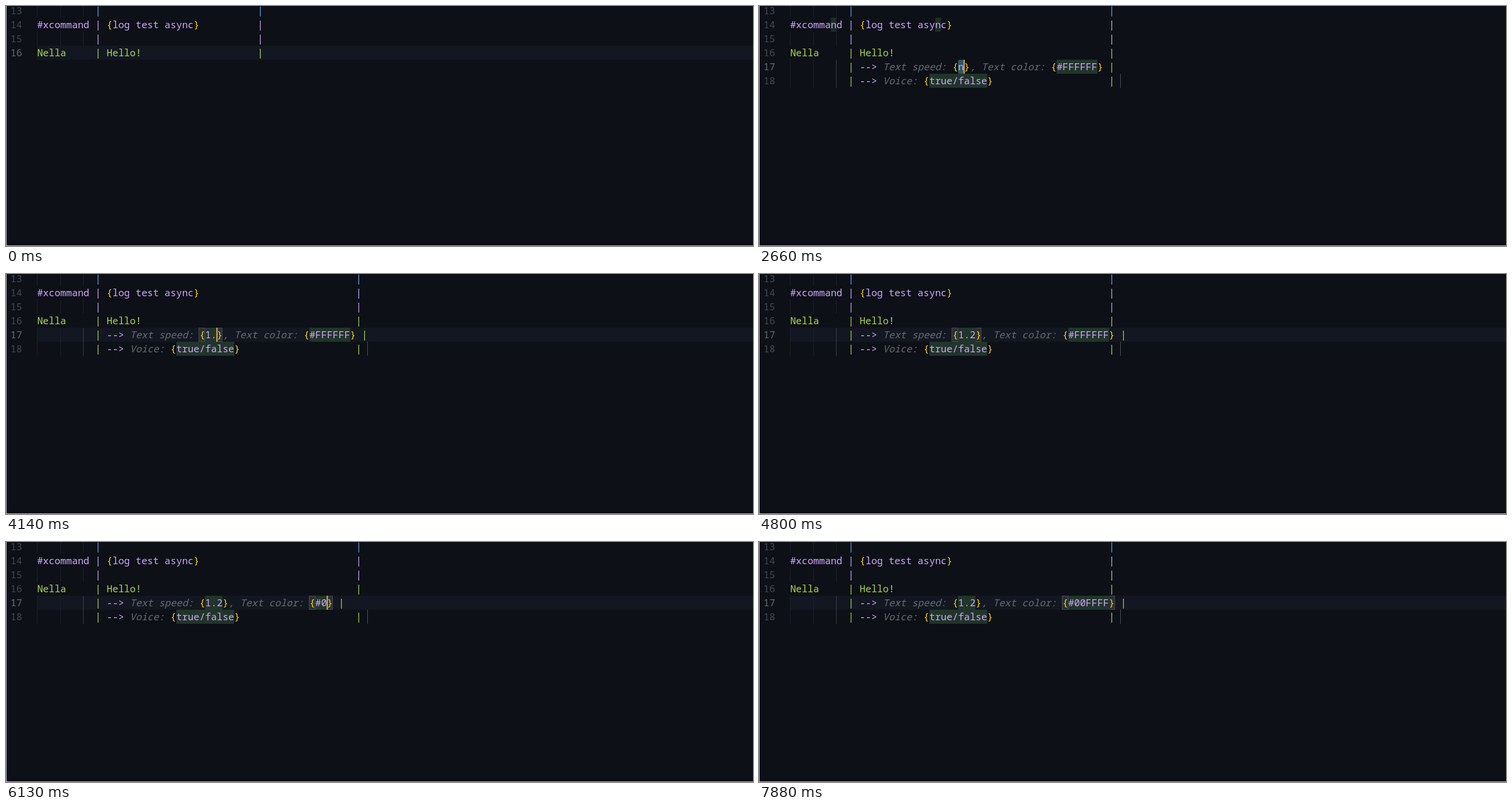
Recreate the animation shown at these times as an HTML page with a canvas. Size 1280 by 411 pixels, loop 8000 ms.

```html
<!DOCTYPE html>
<html lang="en">
<head>
<meta charset="utf-8">
<title>Editor</title>
<style>
html, body { margin: 0; width: 100%; height: 100%; overflow: hidden; background: #0d1017; }
canvas { display: block; }
</style>
</head>
<body>
<canvas id="stage" width="1280" height="411"></canvas>
<script>
const ctx = document.getElementById('stage').getContext('2d', { alpha: false });
const LOOP = 8000, LEFT = 53.4, PITCH = 9.93, LINE = 24, TOP = -4, FIRST = 13;
const FONT = '16.55px "Noto Sans Mono", monospace';
const C = {
  bg: '#0d1017', row: '#131721', num: '#434853', numOn: '#646b74',
  purple: '#d2a6ff', green: '#aad94c', blue: '#59a8f4', gold: '#ffd700',
  note: '#666b72', guide: '#1c2029', guideOn: '#3a3e47', stop: '#4c5056',
  slot: '#21352a', same: '#1c2d27', select: '#2d5860',
  match: '#2b2f36', matchEdge: '#454950', cursor: '#e6b450', edge: '#c4c4c8'
};

const colX = c => LEFT + c * PITCH;
const rowY = n => TOP + (n - FIRST) * LINE;

function box(x, y, w, h, color) {
  ctx.fillStyle = color;
  ctx.fillRect(x, y, w, h);
}

function text(n, col, str, color, italic) {
  ctx.font = (italic ? 'italic ' : '') + FONT;
  ctx.fillStyle = color;
  [...str].forEach((ch, i) => ctx.fillText(ch, colX(col + i), rowY(n) + 18));
}

function mark(n, col, len, color, radius = 0) {
  const x = Math.round(colX(col)), w = Math.round(colX(col + len)) - x;
  ctx.fillStyle = color;
  ctx.beginPath();
  ctx.roundRect(x, rowY(n), w, LINE, radius);
  ctx.fill();
}

function bracketBox(col) {
  const x = Math.round(colX(col)) - 1;
  box(x, rowY(17), 11, LINE, C.match);
  ctx.strokeStyle = C.matchEdge;
  ctx.strokeRect(x + 0.5, rowY(17) + 0.5, 10, LINE - 1);
}

function guides(n, active) {
  [0, 4, 8].forEach(c =>
    box(Math.floor(colX(c)), rowY(n), 1, LINE, active && c === 8 ? C.guideOn : C.guide));
}

function number(n, active) {
  ctx.font = FONT;
  ctx.fillStyle = active ? C.numOn : C.num;
  [...String(n)].forEach((ch, i) => ctx.fillText(ch, 7.8 + i * PITCH, rowY(n) + 18));
}

function cursor(n, col) {
  box(Math.round(colX(col)) - 0.5, rowY(n), 2, LINE, C.cursor);
}

function rowHighlight(n) {
  box(53, rowY(n), 1227, LINE, C.row);
}

const passed = (t, times) => times.filter(s => t >= s).length;

function editorState(t) {
  const speedKeys = passed(t, [3880, 4140, 4360]);
  const colorKeys = passed(t, [5800, 6130, 6330, 6800, 7000, 7200, 7330]);
  const field = t < 5070 ? 0 : 1;
  const selected = field ? !colorKeys : !speedKeys;
  const off = [[3120, 3590], [4800, 5070], [5540, 5800], [7880, LOOP]];
  return {
    speed: speedKeys ? '1.2'.slice(0, speedKeys) : 'n',
    color: colorKeys ? '#00FFFF'.slice(0, colorKeys) : '#FFFFFF',
    field, selected,
    same: t < 3940,
    // bracket matching lags slightly behind the caret
    match: t >= 3940 && t < 5140 ? 0 : t >= 5870 ? 1 : -1,
    caret: !off.some(([a, b]) => t >= a && t < b)
  };
}

function note(n, col, str) {
  text(n, col, str, C.note, true);
}

function value(n, col, str) {
  text(n, col, '{', C.gold);
  text(n, col + 1, str, C.purple);
  text(n, col + 1 + str.length, '}', C.gold);
}

function drawSnippet(t) {
  const s = editorState(t);
  const open = [28, 33 + s.speed.length + 11];
  const values = [s.speed, s.color];
  const close = open.map((c, i) => c + 1 + values[i].length);

  if (!s.selected) rowHighlight(17);
  guides(17, true);
  guides(18, true);
  if (s.same) [7, 25].forEach(c => mark(14, c, 1, C.same));
  if (s.match >= 0) {
    bracketBox(open[s.match]);
    bracketBox(close[s.match]);
  }
  values.forEach((v, i) => {
    const chosen = s.selected && s.field === i;
    mark(17, open[i] + 1, v.length, chosen ? C.select : C.slot, chosen ? 3 : 0);
  });
  mark(18, 24, 10, C.slot);
  box(619, rowY(18), 1, LINE, C.stop);

  text(17, 12, '-->', C.purple);
  note(17, 16, 'Text speed:');
  value(17, open[0], s.speed);
  note(17, close[0] + 1, ', Text color:');
  value(17, open[1], s.color);
  text(17, close[1] + 2, '|', C.green);

  text(18, 12, '-->', C.purple);
  note(18, 16, 'Voice:');
  value(18, 23, 'true/false');
  text(18, 55, '|', C.green);
  [17, 18].forEach(n => text(n, 10, '|', C.green));
  if (s.caret) cursor(17, close[s.field]);
}

function draw(t) {
  const open = t >= 2660;
  const end = open ? 55 : 38;
  box(0, 0, 1280, 411, C.bg);
  if (!open) rowHighlight(16);
  guides(13);
  guides(15);
  if (open) drawSnippet(t);

  for (let n = 13; n <= (open ? 18 : 16); n++) number(n, n === (open ? 17 : 16));
  [C.blue, C.purple, C.purple, C.green].forEach((color, i) => {
    text(13 + i, 10, '|', color);
    text(13 + i, end, '|', color);
  });
  text(14, 0, '#xcommand', C.purple);
  value(14, 12, 'log test async');
  text(16, 0, 'Nella', C.green);
  text(16, 12, 'Hello!', C.green);
  if (!open && passed(t, [650, 1180, 1660, 2170]) % 2) cursor(16, 40);

  box(0, 406, 1280, 4, '#10061a');
  box(0, 410, 1280, 1, C.edge);
  box(0, 0, 1, 411, C.edge);
}

const start = performance.now();
function tick() {
  draw((performance.now() - start) % LOOP);
  requestAnimationFrame(tick);
}
tick();
</script>
</body>
</html>
```
